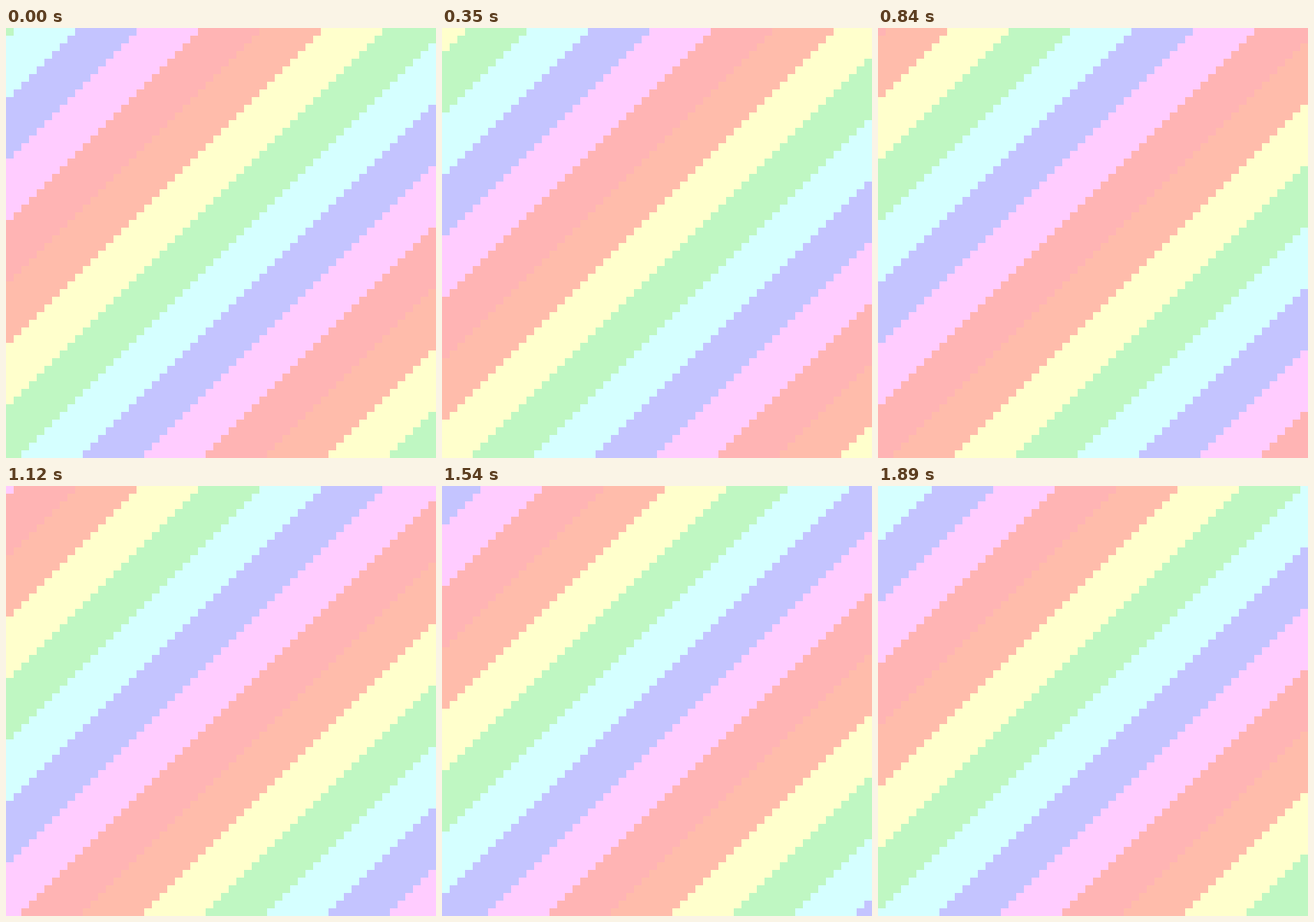
Animation, 560 px wide and 560 px high, one loop 1.96 s. Source, as an HTML page with a canvas:

```html
<!DOCTYPE html>
<html lang="en">
<head>
<meta charset="utf-8">
<title>Pastel stripes</title>
<style>
html, body { margin: 0; width: 100%; height: 100%; overflow: hidden; }
canvas { display: block; width: 560px; height: 560px; }
</style>
</head>
<body>
<canvas id="stage" width="560" height="560"></canvas>
<script>
const ctx = document.getElementById('stage').getContext('2d');
const COLORS = ['#d5ffff', '#c4c4ff', '#ffccff', '#ffb4b4', '#ffbcab', '#ffffcc', '#bff7c2'];
const CELL = 10, GRID = 56, BAND = 8, SHIFT = 2;
const STEP_MS = 70, STEPS = 28;
const PERIOD = COLORS.length * BAND;

const mod = (a, n) => ((a % n) + n) % n;

// Each cell's colour depends only on its diagonal, which slides with the step.
function draw(step) {
  for (let y = 0; y < GRID; y++) {
    for (let x = 0; x < GRID; x++) {
      const d = mod(x + y - 1 - step * SHIFT, PERIOD);
      ctx.fillStyle = COLORS[Math.floor(d / BAND)];
      ctx.fillRect(x * CELL, y * CELL, CELL, CELL);
    }
  }
}

const start = performance.now();
let shown = 0;

function tick() {
  const elapsed = performance.now() - start;
  const step = Math.floor(elapsed / STEP_MS) % STEPS;
  if (step !== shown) draw(shown = step);
  requestAnimationFrame(tick);
}

draw(shown);
requestAnimationFrame(tick);
</script>
</body>
</html>
```
